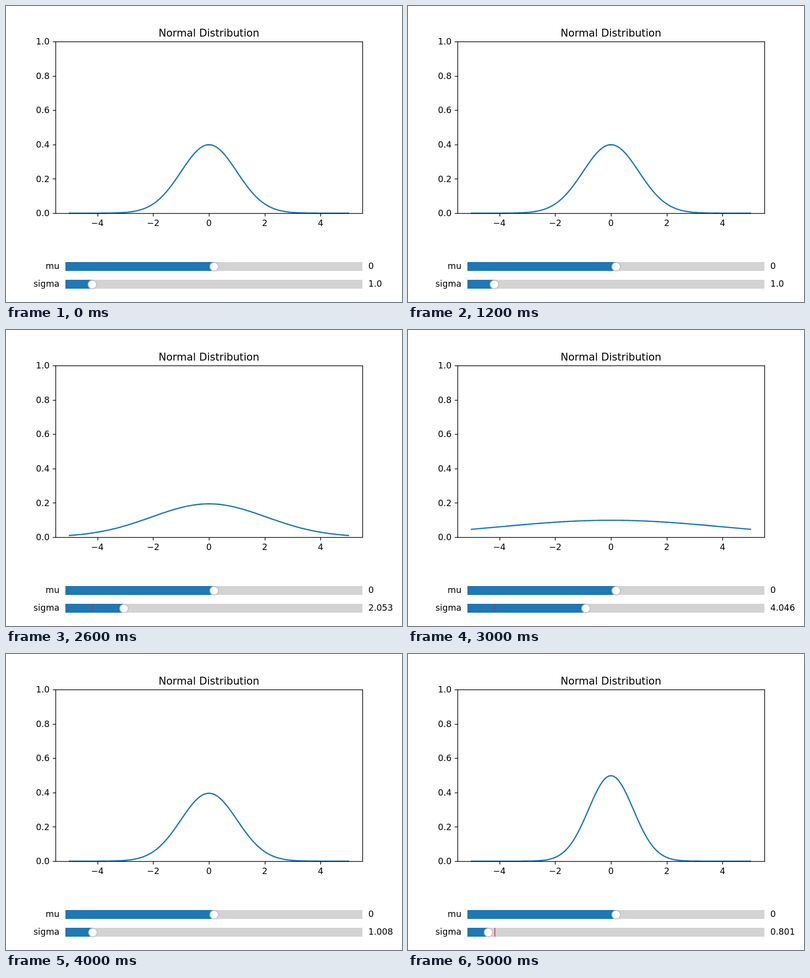
An HTML page that plays this animation: 800x600 px, repeating every 5.2 s.

```html
<!DOCTYPE html>
<html lang="en">
<head>
<meta charset="utf-8">
<title>Normal Distribution</title>
<style>
  html, body { margin: 0; width: 100%; height: 100%; overflow: hidden; background: #fff; }
  svg { display: block; width: 800px; height: 600px; }
  text { font: 17.36px "DejaVu Sans", sans-serif; fill: #000; }
  .title { font-size: 20.83px; }
  .axis { fill: none; stroke: #000; stroke-width: 1.39; }
  .curve { fill: none; stroke: #1f77b4; stroke-width: 2.6; stroke-linecap: square; stroke-linejoin: round; }
  .track { fill: #d3d3d3; }
  .fill { fill: #1f77b4; }
  .start { stroke: #d0202a; stroke-width: 1.4; }
  .handle { fill: #fff; stroke: #bfbfbf; stroke-width: 1.74; }
</style>
</head>
<body>
<svg id="stage" viewBox="0 0 800 600"></svg>
<script>
const STEP = 200;
const MU = [0, -1, -2, -3, -2, -1, 0, 1, 2, 3, 2, 1, 0];
const SIGMA = [2.053, 3.05, 4.046, 5.042, 4.046, 3.05, 2.053, 1.008, 0.801, 0.611, 0.406, 0.611, 0.801];
const STATES = [
  ...MU.map(mu => ({ mu, sigma: 1 })),
  ...SIGMA.map(sigma => ({ mu: 0, sigma }))
];

const stage = document.getElementById('stage');
const plotX = x => 410 + x * 620 / 11;
const plotY = y => 420 - y * 348;
const crisp = v => Math.floor(v + 0.5) + 0.5;
const signed = n => String(n).replace('-', '\u2212');

function add(tag, attrs, content = '') {
  const el = document.createElementNS(stage.namespaceURI, tag);
  for (const key in attrs) el.setAttribute(key, attrs[key]);
  el.textContent = content;
  return stage.appendChild(el);
}

function label(content, x, y, anchor, cls = '') {
  return add('text', { x, y, 'text-anchor': anchor, class: cls }, content);
}

function makeSlider(name, y, min, max, start) {
  const toX = v => 120 + 600 * (v - min) / (max - min);
  const box = { x: 120, y: y - 9, height: 18 };
  add('rect', { ...box, width: 600, class: 'track' });
  const fill = add('rect', { ...box, class: 'fill' });
  const startX = Math.round(toX(start)) + 0.5;
  const mark = add('line', { x1: startX, x2: startX, y1: y - 9, y2: y + 9, class: 'start' });
  const handle = add('circle', { cy: y + 0.5, r: 8.68, class: 'handle' });
  label(name, 108, y + 5, 'end');
  const value = label('', 732, y + 5, 'start');
  return {
    mark,
    set(v, shown) {
      fill.setAttribute('width', toX(v) - 120);
      handle.setAttribute('cx', Math.floor(toX(v)) + 0.5);
      value.textContent = shown;
    }
  };
}

function density(x, mu, sigma) {
  return Math.exp(-(((x - mu) / sigma) ** 2) / 2) / (sigma * Math.sqrt(2 * Math.PI));
}

const curve = add('polyline', { class: 'curve' });
add('rect', { x: 100.5, y: 72.5, width: 620, height: 348, class: 'axis' });
for (let x = -4; x <= 4; x += 2) {
  add('path', { d: `M${crisp(plotX(x))} 420.5v6.08`, class: 'axis' });
  label(signed(x), plotX(x), 446, 'middle');
}
for (let i = 0; i <= 5; i++) {
  const y = plotY(i / 5);
  add('path', { d: `M100.5 ${crisp(y)}h-6.08`, class: 'axis' });
  label((i / 5).toFixed(1), 88, Math.round(y + 6.2), 'end');
}
label('Normal Distribution', 410, 62, 'middle', 'title');
const muSlider = makeSlider('mu', 528, -5, 5, 0);
const sigmaSlider = makeSlider('sigma', 564, 0.1, 10, 1);

function show({ mu, sigma }) {
  const points = Array.from({ length: 201 }, (_, i) => {
    const x = -5 + i / 20;
    return `${plotX(x).toFixed(2)},${plotY(density(x, mu, sigma)).toFixed(2)}`;
  });
  curve.setAttribute('points', points.join(' '));
  muSlider.set(mu, signed(mu));
  sigmaSlider.set(sigma, sigma === 1 ? '1.0' : sigma.toFixed(3));
  // The start mark looks darker where the blue bar covers it.
  sigmaSlider.mark.setAttribute('opacity', sigma > 1 ? 0.6 : 1);
}

let current = -1;
const began = performance.now();
function tick(now) {
  const index = Math.floor(Math.max(0, now - began) / STEP) % STATES.length;
  if (index !== current) show(STATES[current = index]);
  requestAnimationFrame(tick);
}
tick(began);
</script>
</body>
</html>
```
